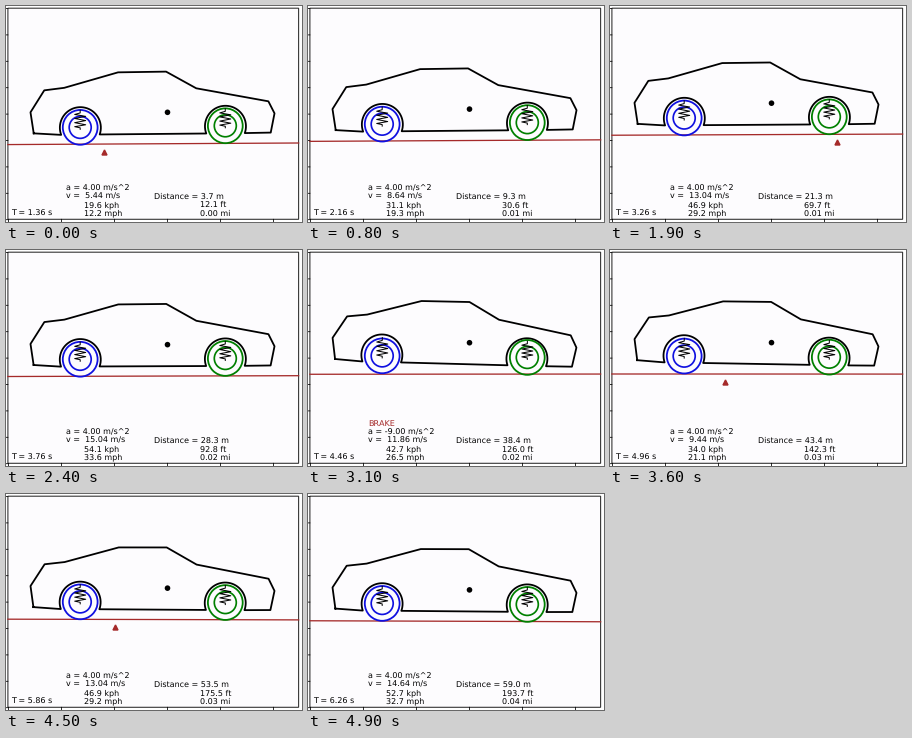
A matplotlib script for the animation above (5000 ms loop, 296 px wide and 216 px high).

```python
import numpy as np
import matplotlib.pyplot as plt
from matplotlib.animation import FuncAnimation
from matplotlib.patches import Circle, Rectangle

W, H, DPI = 296, 216, 100
PX = 72 / DPI                     # points per pixel
FRAMES, STEP, T0 = 50, 0.1, 1.36
SCALE = 53                        # pixels per metre
CG_X, REAR_X, FRONT_X = 161.5, 74.2, 219.3
LEFT, RIGHT, TOP, BOTTOM = 1.9, 292.6, 2.2, 213.3
BRAKE_ON, BRAKE_OFF = 4.0, 4.8
ACCEL, DECEL = 4.0, -9.0

plt.rcParams.update({"font.family": "DejaVu Sans", "text.hinting": "none",
                     "text.hinting_factor": 1, "path.snap": False})
fig = plt.figure(figsize=(W / DPI, H / DPI), dpi=DPI, facecolor="white")
ax = fig.add_axes([0, 0, 1, 1])
ax.set(xlim=(0, W), ylim=(H, 0))
ax.axis("off")


def line(color="black", width=1.0, **kw):
    return ax.plot([], [], color=color, lw=width * PX, **kw)[0]


def label(x, y, color="black"):
    return ax.text(x, y, "", size=8 * PX, color=color, va="baseline")


def drive(t):
    """Acceleration, speed and distance, integrated phase by phase."""
    v = d = 0.0
    for a, start, end in ((ACCEL, 0, BRAKE_ON), (DECEL, BRAKE_ON, BRAKE_OFF),
                          (ACCEL, BRAKE_OFF, np.inf)):
        dt = min(t, end) - start
        d += v * dt + a * dt * dt / 2
        v += a * dt
        if t < end:
            return a, v, d


def settle(t, rate=10):
    t = max(t, 0) * rate
    return 1 - (1 + t) * np.exp(-t)


def ground(px, dist, grade=1.0):
    """Height of the hill; a grade below 1 flattens it across the view."""
    world = dist - 2.5 + grade * (px - CG_X) / SCALE
    return 138.4 - 14.4 * np.sin(world / 25)


def road_y(px, dist):
    return ground(px, dist, grade=0.5)


def arch(cx, cy, r=20.5):
    a = np.radians(np.linspace(-20, 200, 40))
    return list(zip(cx + r * np.cos(a), cy - r * np.sin(a)))


# Body outline relative to the centre of gravity
BODY = np.array(
    [(-134, 19.6), (-137, -1.5), (-123, -23.3), (-103, -25.6), (-49, -40.5),
     (-1, -40.7), (29, -23.7), (101, -9.9), (107, 2.2), (103, 21.4)]
    + arch(FRONT_X - CG_X, 14.6) + arch(REAR_X - CG_X, 14.4) + [(-134, 19.6)])

# Zigzag: sideways offset and fraction of the length
COIL_X = np.array([0, 0, -5.5, 5.5, -5.5, 5.5, -5.5, 5.5, -5.5, 0, 0])
COIL_Y = np.array([0, .14, .22, .32, .43, .54, .65, .76, .86, .92, 1])

# Plot frame with outward ticks
ax.add_patch(Rectangle((LEFT, TOP), RIGHT - LEFT, BOTTOM - TOP,
                       fc="#fdfcfe", ec="#333333", lw=1.1 * PX, zorder=0))
for y in np.arange(2.5, 214, 26.4):
    ax.plot([0, LEFT], [y, y], color="black", lw=0.8 * PX)
for x in np.arange(2.5, 294, SCALE):
    ax.plot([x, x], [BOTTOM, H], color="black", lw=0.8 * PX)

road = line("brown", 1.3)
posts = line("brown", 0.5, ls="none", marker="^", ms=5 * PX)
body = line(width=1.8, solid_joinstyle="round")
springs = [line(zorder=4), line(zorder=4)]
cg = ax.add_patch(Circle((CG_X, 0), 2.8, color="black", lw=0))


def make_wheel(x, color):
    return [ax.add_patch(Circle((x, 0), r, fill=False, ec=color, lw=w * PX, zorder=3))
            for r, w in ((17.4, 1.8), (11, 1.7))]


wheels = [make_wheel(REAR_X, "#1010e0"), make_wheel(FRONT_X, "green")]

brake_text = label(60.5, 176.3, "brown")
texts = [label(x, y) for x, y in (
    (5, 209.8), (60.5, 184.7), (60.5, 192.4), (78.5, 201.4), (78.5, 209.8),
    (148, 193), (194, 201.4), (194, 209.8))]


def update(i):
    t = T0 + i * STEP
    a, v, d = drive(t)
    dive = settle(t - BRAKE_ON) - settle(t - BRAKE_OFF)
    slope = (ground(FRONT_X, d) - ground(REAR_X, d)) / (FRONT_X - REAR_X)
    pitch = slope + 0.028 * dive
    cg_y = road_y(CG_X, d) - 31.4

    xs = np.linspace(LEFT, RIGHT, 60)
    road.set_data(xs, road_y(xs, d))
    marks = CG_X + (np.arange(0, 80, 10) - d + 2.5) * SCALE
    marks = marks[(marks > LEFT) & (marks < RIGHT)]
    posts.set_data(marks, road_y(marks, d) + 8)

    c, s = np.cos(pitch), np.sin(pitch)
    turn = np.array([[c, s], [-s, c]])
    body.set_data(*(BODY @ turn + (CG_X, cg_y)).T)
    cg.center = CG_X, cg_y

    for x, rings, spring, lift in zip((REAR_X, FRONT_X), wheels, springs, (-1.2, 0.7)):
        hub = ground(x, d) - 17.3 + lift * dive
        for ring in rings:
            ring.center = x, hub
        mount = np.array([x - CG_X, -3]) @ turn + (CG_X, cg_y)
        spring.set_data(x + COIL_X + (mount[0] - x) * (1 - COIL_Y),
                        mount[1] + (hub + 2 - mount[1]) * COIL_Y)

    brake_text.set_text("BRAKE" if a < 0 else "")
    values = (f"T = {t:.2f} s", f"a = {a:.2f} m/s^2", f"v =  {v:.2f} m/s",
              f"{v * 3.6:.1f} kph", f"{v * 2.23694:.1f} mph",
              f"Distance = {d:.1f} m", f"{d * 3.28084:.1f} ft",
              f"{d / 1609.344:.2f} mi")
    for text, value in zip(texts, values):
        text.set_text(value)
    return []


anim = FuncAnimation(fig, update, frames=FRAMES, interval=100, repeat=True,
                     repeat_delay=0, blit=False)
plt.show()
```
